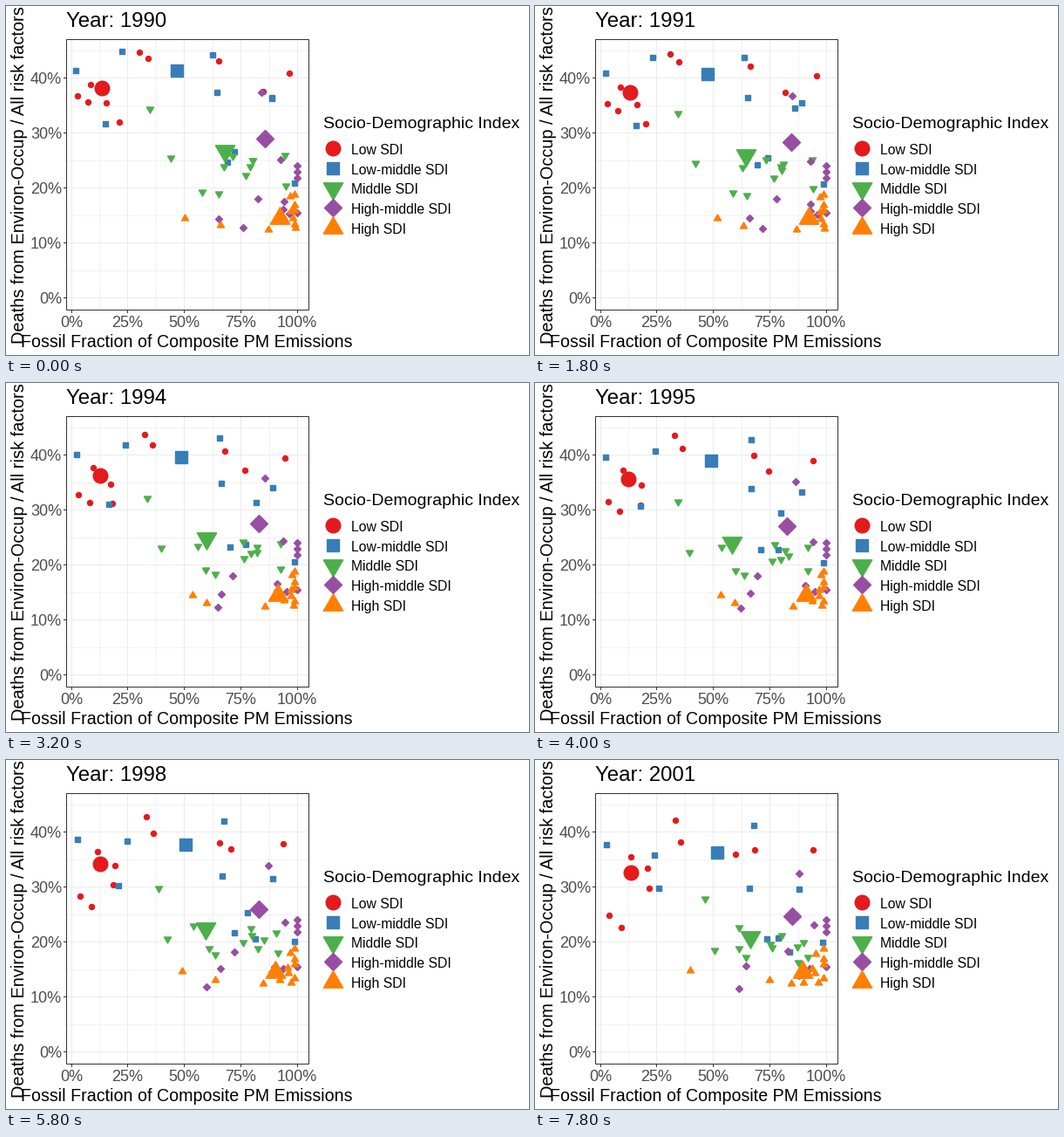
Recreate the animation shown at these times as a matplotlib script. Size 600 by 400 pixels, loop 8000 ms.

```python
import math

import matplotlib.pyplot as plt
from matplotlib.animation import FuncAnimation
from matplotlib.markers import MarkerStyle
from matplotlib.patches import Rectangle
from matplotlib.path import Path
from matplotlib.transforms import ScaledTranslation

plt.rcParams["font.family"] = "Liberation Sans"
plt.rcParams["path.snap"] = False

STEP_MS = 200
FRAMES = 40
HOLD = 5                    # extra frames spent on the first year
LAST = FRAMES - 1 - HOLD
YEARS_PER_STEP = 29 / 89
PX = 0.72                   # points per pixel at 100 dpi
R_BIG, R_SMALL, EDGE = 8.3, 3.0, 1.4
LEFT, RIGHT, TOP, BOTTOM = 69.5, 347.5, 38.5, 348.5


def triangle(up):
    s = 1 if up else -1
    pts = [(-1.347, -1.166 * s), (1.347, -1.166 * s), (0, 1.166 * s), (-1.347, -1.166 * s)]
    codes = [Path.MOVETO, Path.LINETO, Path.LINETO, Path.CLOSEPOLY]
    return MarkerStyle(Path(pts, codes), joinstyle="miter")


def still(x, ys):
    return [(x, y, 0, 0, 0) for y in ys]


class Group:
    """Points as (x, y, drift in x, drift in y, sideways swing); the mean comes first."""

    def __init__(self, name, color, marker, scale, points, shift=0):
        self.name, self.color, self.marker, self.scale = name, color, marker, scale
        self.points, self.shift = points, shift

    def artist(self, r, z):
        return ax.plot([], [], ls="none", marker=self.marker, color=self.color,
                       ms=self.scale * r * PX, mew=EDGE * PX, zorder=z,
                       transform=marker_space)[0]


GROUPS = [
    Group("Low SDI", "#E41A1C", "o", 2.0, [
        (111, 95, 0, 35, -3),
        (154, 54, 8, 16, 3), (164, 61, 4, 34, 4), (245, 64, -14, 45, 13),
        (326, 78, -6, 26, -4), (98, 91, 13, 21, -2), (83, 104, 3, 75, 0),
        (95, 111, 5, 82, 0), (116, 112, 14, 13, 0), (131, 134, 1, 14, -10),
        (296, 99, -43, 5, -9)]),
    Group("Low-middle SDI", "#377EB8", "s", 1.772, [
        (197, 75, 13, 32, 0),
        (81, 75, 2, 23, 0), (134, 53, 4, 57, 3), (238, 57, 14, 19, 4),
        (243, 100, 4, 48, 4), (306, 107, -2, 42, 2), (306, 106, -26, 99, -12),
        (115, 136, 28, 12, -6), (263, 168, 30, 53, 3), (255, 180, 12, 26, -1),
        (332, 204, -1, 6, 0)]),
    Group("Middle SDI", "#4DAF4A", triangle(False), 2.694, [
        (252, 170, -4, 37, -24),
        (166, 120, 30, 41, -15), (190, 176, 17, 44, -20), (226, 215, 9, 3, 1),
        (245, 217, -2, 11, -4), (251, 186, -16, 8, -30), (261, 174, 23, 29, 5),
        (281, 186, 21, 30, 1), (276, 196, -3, 21, -2), (321, 173, -12, 38, -2),
        (322, 208, -8, 20, -5), (284, 179, -13, 34, 10), (284, 179, 19, 55, -10),
    ], shift=3),
    Group("High-middle SDI", "#984EA3", "D", 1.772, [
        (298, 153, -2, 27, -8),
        (294, 100, 10, 31, 1), (316, 177, 5, 13, 1), (290, 222, 1, -2, -35),
        (245, 245, -2, -8, 4), (273, 255, -38, 8, -20), (320, 225, -9, 18, -6),
        (319, 234, -15, 14, -3), (326, 239, -10, 1, 0),
    ] + still(335, (184, 191, 198, 238))),
    Group("High SDI", "#FF7F00", triangle(True), 2.694, [
        (315, 241, -7, 0, 0),
        (206, 243, -27, -2, 20), (247, 251, 23, 1, -28), (302, 256, -7, 0, -2),
        (327, 218, -4, 4, 3), (330, 243, -8, 1, 0), (333, 254, -7, 1, 0),
        (321, 245, -12, 10, 3), (328, 235, -9, 4, 3),
    ] + still(332, (216, 228, 234, 250)), shift=-3),
]


def place(point, t):
    x, y, dx, dy, swing = point
    return x + dx * t + swing * math.sin(math.pi * t), y + dy * t


fig = plt.figure(figsize=(6, 4), dpi=100, facecolor="white")
ax = fig.add_axes([0, 0, 1, 1])
ax.set_xlim(0, 600)
ax.set_ylim(400, 0)
ax.axis("off")
# Markers are drawn on whole pixels, so nudge them before rounding
marker_space = ax.transData + ScaledTranslation(-0.006, 0.006, fig.dpi_scale_trans)


def text(x, y, s, size, color="black", **kw):
    return ax.text(x, y, s, fontsize=size * PX, color=color, va="baseline", **kw)


def line(xs, ys, color, width=1.0):
    ax.plot(xs, ys, color=color, lw=width * PX, solid_capstyle="butt", zorder=1)


# Panel: grid, ticks, border
for k in range(9):
    x = math.floor(75 + k * 32.45) + 0.5
    line([x, x], [TOP, BOTTOM], "#EBEBEB", 0.6 if k % 2 else 1)
    if k % 2 == 0:
        line([x, x], [BOTTOM, BOTTOM + 3.5], "#333333")
        text(x - 0.5, 368, f"{k * 12.5:.0f}%", 18, "#4D4D4D", ha="center")
for k in range(10):
    y = math.floor(334.5 - k * 31.5) + 0.5
    line([LEFT, RIGHT], [y, y], "#EBEBEB", 0.6 if k % 2 else 1)
    if k % 2 == 0:
        line([LEFT - 3.5, LEFT], [y, y], "#333333")
        text(64, y + 6.8, f"{k * 5}%", 18, "#4D4D4D", ha="right")
ax.add_patch(Rectangle((LEFT, TOP), RIGHT - LEFT, BOTTOM - TOP, fill=False,
                       ec="#333333", lw=PX, zorder=20))

title = text(69, 24, "", 24)
text(207.5, 391, "Fossil Fraction of Composite PM Emissions", 19.65, ha="center")
text(21, 194, "Deaths from Environ-Occup / All risk factors", 20,
     rotation=90, rotation_mode="anchor", ha="center")

# Legend
text(364, 140.5, "Socio-Demographic Index", 19.5)
layers = []
for n, group in enumerate(GROUPS):
    y = 163.3 + 22.9 * n
    text(396, y + 6.3, group.name, 15.8)
    group.artist(R_BIG, 3).set_data([375.5], [y + group.shift])
    layers.append((group.artist(R_SMALL, 3 + n), group.points[1:]))
    layers.append((group.artist(R_BIG, 3 + n), group.points[:1]))


def draw(frame):
    step = max(0, frame - HOLD)
    title.set_text(f"Year: {1990 + round(step * YEARS_PER_STEP)}")
    for artist, points in layers:
        artist.set_data(*zip(*(place(p, step / LAST) for p in points)))
    return [title] + [artist for artist, _ in layers]


anim = FuncAnimation(fig, draw, frames=FRAMES, interval=STEP_MS,
                     repeat=True, repeat_delay=0, blit=False)
plt.show()
```
